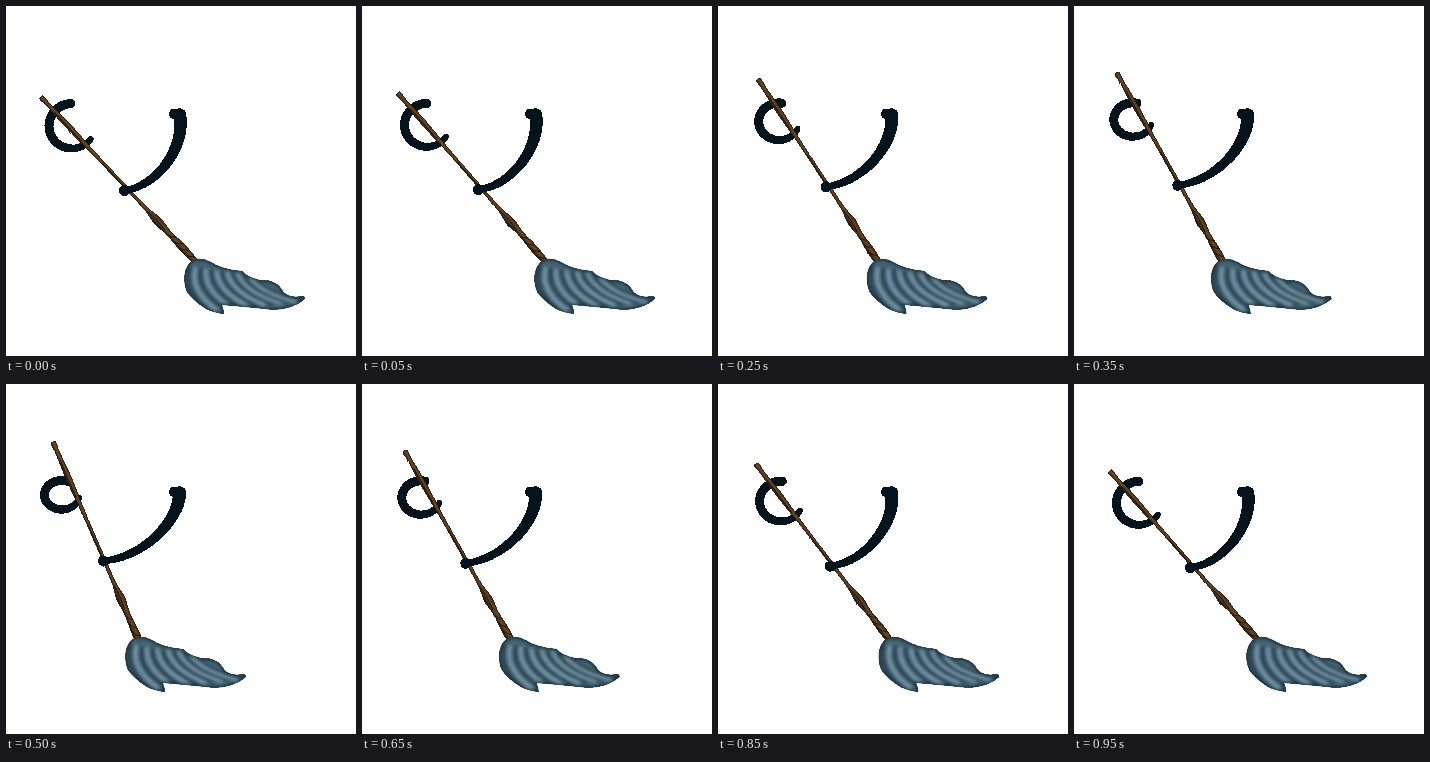
Animation of 350x350 px, one loop 1 s. Source, as an HTML page:

```html
<!DOCTYPE html>
<html lang="en">
<head>
<meta charset="utf-8">
<title>Mopping</title>
<style>
  html, body { margin: 0; width: 100%; height: 100%; overflow: hidden; background: #fff; }
  svg { display: block; width: 100vw; height: 100vh; }
  .arm { fill: #04131c; shape-rendering: crispEdges; }
  .outline { shape-rendering: crispEdges; }
  .strands path { fill: none; stroke-linecap: round; }
</style>
</head>
<body>
<svg viewBox="0 0 350 350">
  <defs>
    <linearGradient id="wood" x1="0" y1="-4" x2="0" y2="4" gradientUnits="userSpaceOnUse">
      <stop offset="0" stop-color="#3d2a15"/>
      <stop offset=".45" stop-color="#664828"/>
      <stop offset="1" stop-color="#20140a"/>
    </linearGradient>
    <filter id="soft" x="-20%" y="-20%" width="140%" height="140%">
      <feGaussianBlur stdDeviation="1.5"/>
    </filter>
    <path id="wool" d="M190 253C179 256 175 272 181 286Q186 294 200 303Q208 307 218 308
      Q218 304 216 299Q240 301 268 304Q288 303 299 293Q299 290 296 290Q280 293 275 282
      Q268 273 254 274Q241 271 236 265Q215 263 205 256Q198 252 190 253Z"/>
    <clipPath id="woolClip"><use href="#wool"/></clipPath>
  </defs>
  <path id="leftArm" class="arm"/>
  <g id="stick">
    <path id="handle" class="outline" fill="url(#wood)" stroke="#21150a" stroke-width=".9"/>
    <path id="grain" fill="none" stroke="#21150a"/>
  </g>
  <g id="head">
    <use href="#wool" class="outline" fill="#456373"/>
    <g clip-path="url(#woolClip)">
      <g class="strands" filter="url(#soft)">
        <g id="strands"></g>
        <use href="#wool" fill="none" stroke="#1c303c" stroke-width="3.5"/>
      </g>
    </g>
  </g>
  <path id="rightArm" class="arm"/>
</svg>
<script>
const $ = id => document.getElementById(id);
const mix = (a, b, p) => a + (b - a) * p;
const mixPoint = (a, b, p) => a.map((v, i) => mix(v, b[i], p));
const bump = (x, center, spread) => Math.exp(-(((x - center) / spread) ** 2));

const disc = (x, y, r) => `M${x - r} ${y}a${r} ${r} 0 1 0 ${2 * r} 0a${r} ${r} 0 1 0 ${-2 * r} 0`;

// A limb is a run of overlapping discs along a spine.
function limb(spine, radius, count = 70) {
  let d = "";
  for (let i = 0; i <= count; i++) {
    const t = i / count;
    d += disc(...spine(t), radius(t));
  }
  return d;
}

function bezier(a, b, c, d, t) {
  const ab = mixPoint(a, b, t), bc = mixPoint(b, c, t), cd = mixPoint(c, d, t);
  return mixPoint(mixPoint(ab, bc, t), mixPoint(bc, cd, t), t);
}

function leftArm(p) {
  const cx = mix(66, 56, p), cy = mix(120, 111, p);
  const rx = mix(23, 17.5, p), ry = mix(22.5, 14.5, p);
  const from = mix(-93, -72, p), to = mix(-325, -350, p);
  const spine = t => {
    const a = mix(from, to, t) * Math.PI / 180;
    return [cx + rx * Math.cos(a), cy + ry * Math.sin(a)];
  };
  return limb(spine, t => 4.6 - 1.8 * t ** 4);
}

function rightArm(p) {
  const shoulder = [173.5, 109];
  const upper = mixPoint([180, 140], [173, 137], p);
  const lower = mixPoint([152, 180], [138, 173], p);
  const hand = mixPoint([118.5, 184.5], [97.5, 177], p);
  return limb(t => bezier(shoulder, upper, lower, hand, t), t => mix(6.8, 3.3, t))
    + disc(168.5, 108, 5.5) + disc(...hand, 5.5);
}

// Half width of the handle at distance s from its top.
const halfWidth = s => 1.5 + .8 * bump(s, 3, 4) + 1.1 * bump(s, 38, 26)
  + 2.5 * bump(s, 171, 11) + 2 * bump(s, 208, 20);

function drawHandle() {
  const top = [], bottom = [];
  for (let s = 0; s <= 225; s += 3) {
    top.push([s, -halfWidth(s)]);
    bottom.unshift([s, halfWidth(s)]);
  }
  $("handle").setAttribute("d", `M${top.concat(bottom).join("L")}Z`);
  let grain = "M20 .9H60M90 .7H130M156 1Q166-1 182 1";
  for (let s = 186; s < 222; s += 9) grain += `M${s} 3Q${s + 5} 2 ${s + 9}-3`;
  $("grain").setAttribute("d", grain);
}

// Locks fan out from the left edge to the tail, alternating shade and shine.
function drawStrands(count = 13) {
  let out = "";
  for (let i = 0; i < count; i++) {
    const u = i / (count - 1);
    const start = mixPoint([184, 262], [248, 271], u);
    const bend = mixPoint([177, 284], [262, 288], u);
    const end = mixPoint([202, 304], [298, 295], u);
    const color = i % 2 ? "#7397a9" : "#2a4351";
    out += `<path d="M${start}Q${bend} ${end}" stroke="${color}" stroke-width="${mix(3.6, 2.6, u)}"/>`;
  }
  $("strands").innerHTML = out;
}

const half = 111, loop = 1000, step = 50;

function draw(time) {
  const k = Math.floor(time % loop / step);
  const p = 1 - Math.abs(k - 10) / 10;
  const [x, y] = mixPoint([111, 171.9], [91.1, 159.9], p);
  const angle = mix(46.8, 66.6, p);
  $("stick").setAttribute("transform", `translate(${x} ${y}) rotate(${angle}) translate(${-half} 0)`);
  $("head").setAttribute("transform", `translate(${-59 * p} 0)`);
  $("leftArm").setAttribute("d", leftArm(p));
  $("rightArm").setAttribute("d", rightArm(p));
}

drawHandle();
drawStrands();
const start = performance.now();
function tick() {
  draw(performance.now() - start);
  requestAnimationFrame(tick);
}
tick();
</script>
</body>
</html>
```
